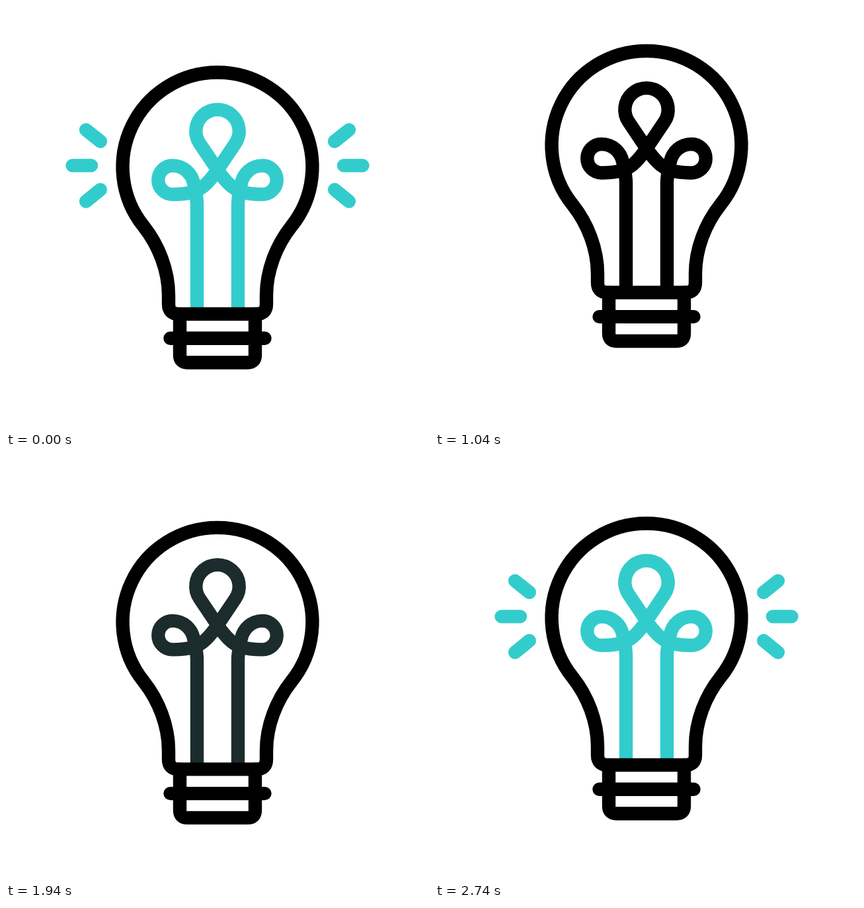
Animation, 640 px wide and 640 px high, one loop 3 s. Source, as an HTML page with a canvas:

```html
<!DOCTYPE html>
<html lang="en">
<head>
<meta charset="utf-8">
<title>Light bulb</title>
<style>
html, body { margin: 0; width: 100%; height: 100%; overflow: hidden; background: #fff; }
canvas { display: block; width: 640px; height: 640px; }
</style>
</head>
<body>
<canvas id="stage" width="640" height="640"></canvas>
<script>
const ctx = document.getElementById('stage').getContext('2d');
const LOOP = 3000;
const TEAL = [51, 204, 204];
const BLACK = [0, 0, 0];
const DUSK = [28, 43, 43];

const clamp = v => Math.min(1, Math.max(0, v));
const progress = (t, from, to) => clamp((t - from) / (to - from));
const smooth = u => u * u * (3 - 2 * u);
const mix = (a, b, u) => a + (b - a) * u;
const mixColor = (a, b, u) => a.map((v, i) => Math.round(mix(v, b[i], u)));
const css = c => `rgb(${c.join(',')})`;

// Cubic ease with flat ends and horizontal handles at x1 and x2.
function ease(x1, x2) {
  return u => {
    let lo = 0, hi = 1;
    for (let i = 0; i < 24; i++) {
      const s = (lo + hi) / 2, r = 1 - s;
      if (3 * s * r * r * x1 + 3 * s * s * r * x2 + s * s * s < u) lo = s;
      else hi = s;
    }
    return smooth((lo + hi) / 2);
  };
}

// Each key: end time, height offset, easing into it.
const heightKeys = [
  [200, 0, smooth],
  [467, 24, smooth],
  [1733, -43, ease(0.13, 0.03)],
  [2067, 24, ease(0.34, 0.57)],
  [2400, -16, smooth],
  [2733, 0, smooth]
];

function heightAt(t) {
  let [prevTime, prev] = [0, 0];
  for (const [time, value, easing] of heightKeys) {
    if (t < time) return mix(prev, value, easing(progress(t, prevTime, time)));
    [prevTime, prev] = [time, value];
  }
  return prev;
}

function filamentColor(t) {
  if (t < 1000) return mixColor(TEAL, BLACK, progress(t, 200, 467));
  if (t < 1940) return mixColor(BLACK, DUSK, progress(t, 1867, 1940));
  return mixColor(DUSK, TEAL, progress(t, 1940, 2180));
}

function rayLength(t) {
  return t < 1000 ? 1 - smooth(progress(t, 200, 467)) : smooth(progress(t, 2067, 2333));
}

const glass = new Path2D(`M320 100.5
  A143 143 0 0 0 208 333 C231 362 246 400 246 438 V451 Q246 466 261 466
  H379 Q394 466 394 451 V438 C394 400 409 362 432 333 A143 143 0 0 0 320 100.5 Z`);

const socket = new Path2D(`M263 466 V528 Q263 539.5 274.5 539.5
  H365.5 Q377 539.5 377 528 V466 M248.5 502.7 H391.5`);

const filament = new Path2D(`M289 464 V300 C289 288 286 278 284 268
  C281 254 269 241.5 252 241.5 A21.75 21.75 0 0 0 252 285
  C263 285 275 284 284 281 C298 277 309 264 320 248 L347.1 207.7
  A32.7 32.7 0 1 0 292.9 207.7 L320 248
  C331 264 342 277 356 281 C365 284 377 285 388 285
  A21.75 21.75 0 0 0 388 241.5 C371 241.5 359 254 356 268
  C354 278 351 288 351 300 V464`);

// Inner end first; mirrored for the right side.
const rays = [
  [142.8, 204.8, 121, 187.4],
  [129, 241.4, 100.5, 241.4],
  [142.8, 277.9, 121, 295.6]
];

function drawRays(length) {
  if (length <= 0) return;
  ctx.strokeStyle = css(TEAL);
  ctx.beginPath();
  for (const [x1, y1, x2, y2] of rays) {
    const x = mix(x1, x2, length), y = mix(y1, y2, length);
    ctx.moveTo(x1, y1);
    ctx.lineTo(x, y);
    ctx.moveTo(640 - x1, y1);
    ctx.lineTo(640 - x, y);
  }
  ctx.stroke();
}

function draw(t) {
  ctx.fillStyle = '#fff';
  ctx.fillRect(0, 0, 640, 640);
  ctx.lineWidth = 20.4;
  ctx.lineCap = 'round';
  ctx.lineJoin = 'round';
  drawRays(rayLength(t));

  ctx.save();
  ctx.translate(0, heightAt(t));
  ctx.lineCap = 'butt';
  ctx.strokeStyle = css(filamentColor(t));
  ctx.stroke(filament);
  ctx.lineCap = 'round';
  ctx.strokeStyle = '#000';
  ctx.stroke(glass);
  ctx.stroke(socket);
  ctx.restore();
}

const start = performance.now();
function tick() {
  draw((performance.now() - start) % LOOP);
  requestAnimationFrame(tick);
}
tick();
</script>
</body>
</html>
```
